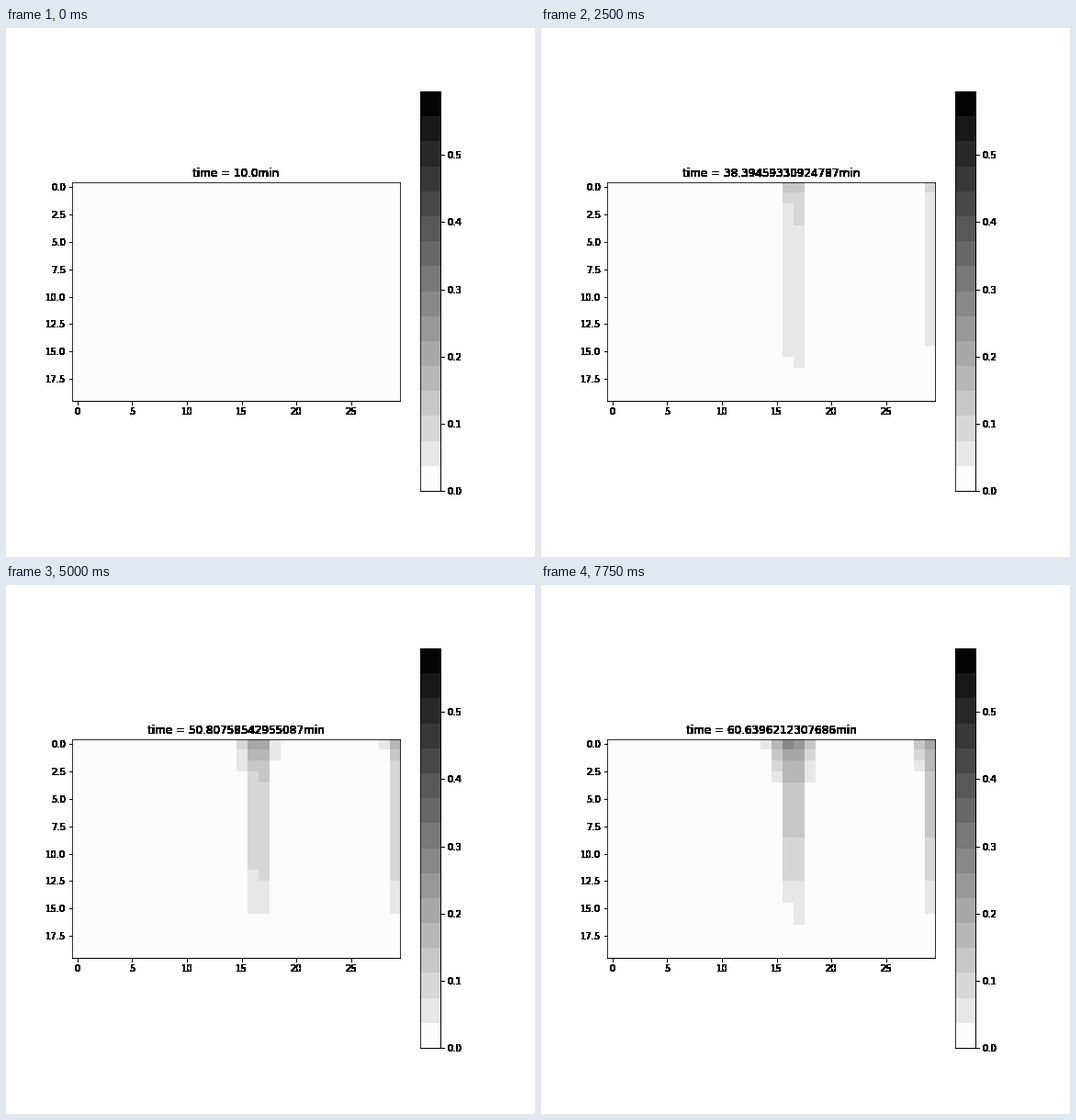
A matplotlib script for the animation above (8 s loop, 576 by 576 pixels).

```python
import numpy as np
import matplotlib.pyplot as plt
from matplotlib.animation import FuncAnimation
from matplotlib.colors import ListedColormap

FRAMES, INTERVAL = 32, 250
ROWS, COLS, LEVELS, VMAX = 20, 30, 16, 0.5946

plt.rcParams.update({
    "font.family": "DejaVu Sans", "font.size": 10, "text.kerning_factor": 6,
    "figure.subplot.bottom": 0.125, "figure.subplot.top": 0.88,
})

# Clock readings (minutes) at a few key steps
CLOCK = {0: 10.0, 5: 29.624951524830035, 10: 38.39459330924787,
         14: 43.97383081999278, 20: 50.80758542955087,
         27: 57.22960137115549, 31: 60.6396212307686}


def clock(step):
    """Elapsed minutes; the square grows almost evenly with the step."""
    if step in CLOCK:
        return CLOCK[step]
    squares = [t * t for t in CLOCK.values()]
    return float(np.sqrt(np.interp(step, list(CLOCK), squares)))


depth = np.arange(ROWS)


def plume(step, base, rate, reach, cap, onset=0):
    """Deep column: a plateau that rounds off with growth, plus a top cap."""
    plateau = max(base + rate * step, 0.1)
    body = plateau * (1 - (depth / reach) ** (14 / plateau ** 1.4))
    top = cap * (1 - np.exp(-max(step - onset, 0) / 11.5))
    return body + top * np.exp(-depth / 1.55)


def halo(step, start, rate):
    """Shallow column beside a plume."""
    return rate * max(step - start, 0) * np.exp(-depth / 2.6)


def field(step):
    amount = np.zeros((ROWS, COLS))
    amount[:, 14] = halo(step, 12, 0.07)
    amount[:, 15] = halo(step, 8.7, 0.2)
    amount[:, 16] = plume(step, 0.08, 0.125, 17.5, 3.3)
    amount[:, 17] = plume(step, 0.69, 0.102, 18.5, 3.3)
    amount[:, 18] = halo(step, 6.7, 0.15)
    amount[:, 28] = halo(step, 14.2, 0.18)
    amount[:, 29] = plume(step, 0.18, 0.112, 17.3, 2.3, onset=5)

    # Flicker grows with depth
    rng = np.random.default_rng(step)
    amount += rng.normal(0, 0.15, amount.shape) * depth[:, None] / ROWS
    level = np.clip(np.floor(amount), 0, LEVELS - 1)
    return (level + 0.5) * VMAX / LEVELS


def harden(img, dpi):
    """Make every touched pixel opaque, so edges lose their smoothing."""
    out = img.copy()
    out[..., 3] = img[..., 3] > 0
    return out, 0, 0


greys = (247 - 15.9 * np.arange(LEVELS)) / 255
greys[0], greys[-1] = 252 / 255, 4 / 255
cmap = ListedColormap(np.repeat(greys[:, None], 3, axis=1))

fig, ax = plt.subplots(figsize=(8, 8), dpi=72, facecolor="white")
im = ax.imshow(field(0), cmap=cmap, vmin=0, vmax=VMAX,
               interpolation="nearest")
ax.set_xticks(np.arange(0, COLS, 5))
ax.set_yticks(np.arange(0, ROWS, 2.5))
cbar = fig.colorbar(im, ax=ax, ticks=np.arange(6) / 10)
title = ax.set_title("", fontsize=12)
for part in (ax, cbar.ax):
    part.set_agg_filter(harden)


def update(step):
    im.set_data(field(step))
    title.set_text(f"time = {clock(step)}min")
    return im, title


anim = FuncAnimation(fig, update, frames=FRAMES, interval=INTERVAL,
                     repeat=True, repeat_delay=0, blit=False)
plt.show()
```
